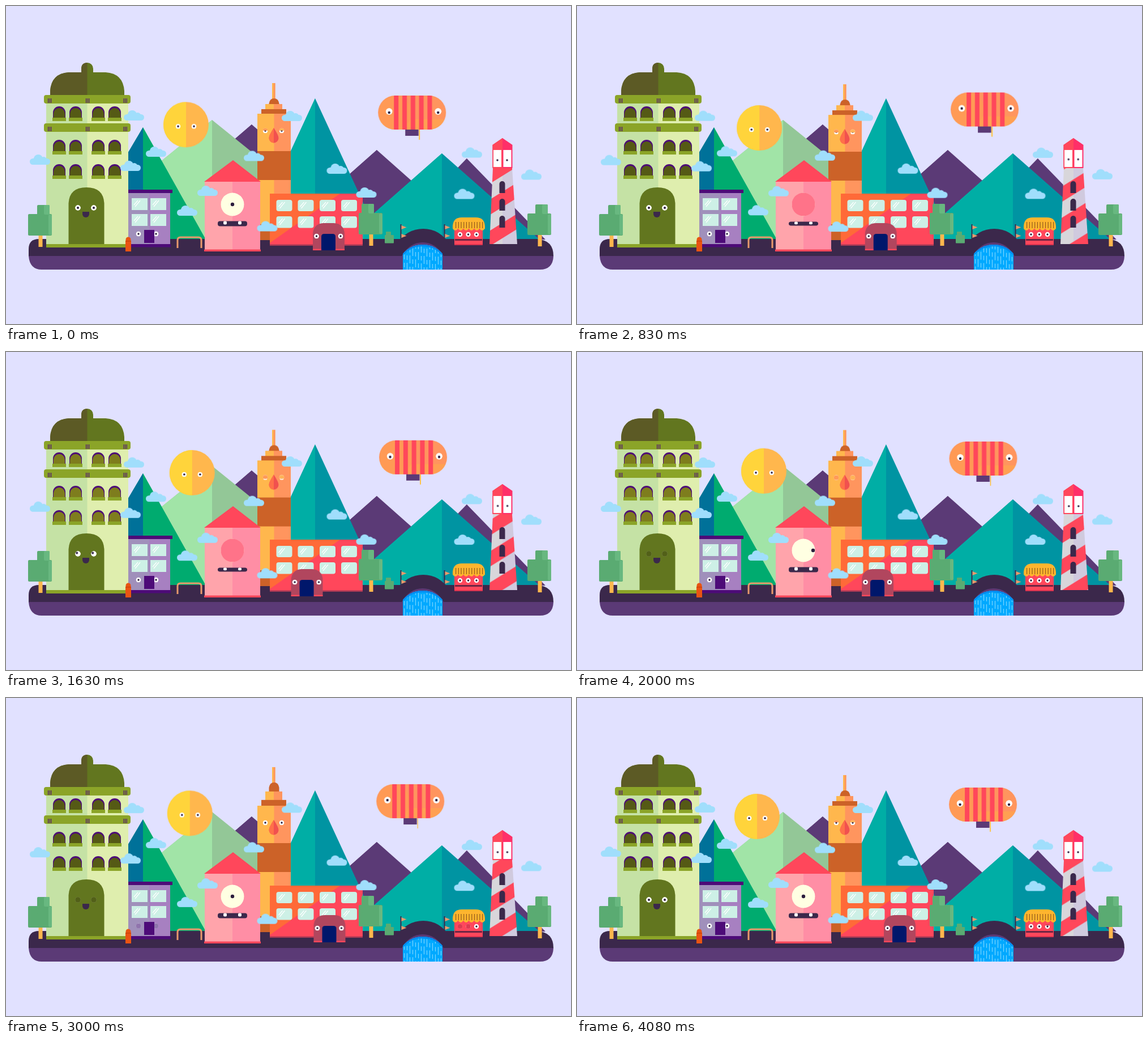
An HTML page for the animation above (4.12 s loop, 998 by 561 pixels).

```html
<!DOCTYPE html>
<html lang="en">
<head>
<meta charset="utf-8">
<title>Little city</title>
<style>
  html, body { margin: 0; width: 100%; height: 100%; overflow: hidden; background: #e1e1ff; }
  svg { display: block; width: 100%; height: 100%; }
  svg * { animation: 4120ms linear infinite; transform-origin: 0 0; }

  .sun { animation-name: orbit; }
  .sway, .bob, .peek, .cloud {
    animation-timing-function: cubic-bezier(.37, 0, .63, 1);
    animation-direction: alternate;
  }
  .sway { animation-name: sway; animation-duration: 2060ms; animation-delay: -1030ms; }
  .bob { animation-name: bob; animation-duration: 1030ms; }
  .peek { animation-name: peek; animation-duration: 1030ms; }
  .cloud { animation-name: drift; animation-duration: 2060ms; }
  .prop { animation-name: spin; animation-duration: 206ms; animation-direction: alternate; }
  .poles { animation-name: barber; animation-duration: calc(4120ms / 3); }
  .fall { animation-name: fall; stroke-dasharray: 8 5 14 6; }
  .squash { animation-name: squash; animation-timing-function: ease-in-out; }
  .rise { animation-name: rise; animation-timing-function: ease-in-out; }
  .slide { animation-name: slide; }
  .lit { animation-name: lit; }
  .chew { animation-name: chew; }
  .teeth { animation-name: teeth; }
  .grin { animation-name: grin; }
  .glance { animation-name: glance; }
  .gaze { animation-name: gaze; }
  .scan { animation-name: scan; }
  .lid { transform: scaleY(0); }
  .lid.hall { animation-name: lidHall; }
  .lid.villa { animation-name: lidVilla; }
  .lid.cyclops { animation-name: lidCyclops; }
  .lid.spire { animation-name: lidSpire; }
  .lid.gate { animation-name: lidGate; }
  .lid.kiosk { animation-name: lidKiosk; }

  @keyframes orbit {
    from { transform: rotate(180deg) translateX(6px) rotate(-180deg); }
    to { transform: rotate(-180deg) translateX(6px) rotate(180deg); }
  }
  @keyframes sway { from { transform: translateX(-3px); } to { transform: translateX(3px); } }
  @keyframes bob { from { transform: translateY(3px); } to { transform: translateY(-3px); } }
  @keyframes peek { from { transform: translateY(2px); } to { transform: none; } }
  @keyframes drift { from { transform: none; } to { transform: translateY(var(--d)); } }
  @keyframes spin { to { transform: scaleX(.3); } }
  @keyframes barber { to { transform: translateY(55px); } }
  @keyframes fall { to { stroke-dashoffset: -132; } }
  @keyframes squash {
    0%, 72.8%, 100% { transform: none; }
    10.2% { transform: translateY(calc(var(--k) * 3px)); }
    31.3%, 61.7% { transform: translateY(calc(var(--k) * 1px)); }
    48.5% { transform: translateY(calc(var(--k) * 1.7px)); }
  }
  @keyframes rise {
    0%, 65%, 99%, 100% { transform: none; }
    72.8% { transform: translateY(calc(var(--k) * -.54px)); }
    80% { transform: translateY(calc(var(--k) * -1px)); }
    93% { transform: translateY(calc(var(--k) * -.42px)); }
  }
  @keyframes slide {
    0%, 100% { transform: none; }
    5% { transform: translateX(-2px); }
    10.2%, 61.7% { transform: translateX(-13px); }
    22% { transform: translateX(-37px); }
    31.3% { transform: translateX(-38px); }
    48.5% { transform: translateX(-39px); }
    55% { transform: translateX(-34px); }
    70% { transform: translateX(1px); }
    72.8% { transform: translateX(1.5px); }
  }
  @keyframes lit { 0%, 24%, 57.5%, 100% { fill: #555a15; } 24.7%, 56.8% { fill: #7e7d1d; } }
  @keyframes chew {
    0%, 28%, 37%, 57%, 67%, 100% { transform: none; }
    30%, 34%, 60%, 64% { transform: scaleY(.26); }
  }
  @keyframes teeth { 0%, 29%, 36%, 59%, 66%, 100% { opacity: 0; } 30%, 34%, 60%, 64% { opacity: 1; } }
  @keyframes grin {
    0%, 6%, 45%, 57%, 67%, 100% { transform: none; }
    9%, 42%, 60%, 64% { transform: scaleY(.75); }
  }
  @keyframes glance {
    0%, 24%, 77%, 100% { transform: none; }
    28%, 70% { transform: translate(-1.8px, -1.5px); }
  }
  @keyframes gaze { 0%, 44%, 58%, 100% { transform: none; } 47.5%, 53% { transform: translateX(17px); } }
  @keyframes scan {
    0%, 100% { transform: none; }
    10% { transform: translateY(-2px); }
    48% { transform: translateX(.8px); }
  }
  @keyframes lidHall {
    0%, 45%, 52.5%, 69%, 76.5%, 100% { transform: scaleY(0); }
    46.5%, 51%, 70.5%, 75% { transform: none; }
  }
  @keyframes lidVilla {
    0%, 28%, 34.5%, 70%, 76%, 100% { transform: scaleY(0); }
    29.5%, 33%, 71.5%, 74.5% { transform: none; }
  }
  @keyframes lidCyclops {
    0%, 6%, 45%, 57%, 67%, 100% { transform: scaleY(0); }
    9%, 42%, 60%, 64% { transform: none; }
  }
  @keyframes lidSpire {
    0%, 31.3%, 100% { transform: scaleY(.5); }
    10.2% { transform: scaleY(.8); }
    45%, 64% { transform: none; }
    70%, 90% { transform: scaleY(0); }
  }
  @keyframes lidGate {
    0%, 7%, 14%, 58%, 66%, 100% { transform: scaleY(0); }
    9%, 12%, 60%, 63.5% { transform: none; }
  }
  @keyframes lidKiosk { 0%, 57%, 83%, 100% { transform: scaleY(0); } 59%, 80% { transform: none; } }
</style>
</head>
<body>
<svg id="stage" viewBox="0 0 998 561" preserveAspectRatio="none"></svg>
<script>
const INK = '#3b284b', PLUM = '#5b3a76', VIOLET = '#4d0b78', RED = '#ff475b', MOSS = '#8ba428',
      AMBER = '#ffb74d', CORAL = '#ff955e', BROWN = '#cc6228', GLASS = '#cdf0e6';

const each = (list, fn) => list.map(fn).join('');
const count = (n, fn) => each([...Array(n).keys()], fn);
const rect = (x, y, w, h, fill, rx = 0, more = '') =>
  `<rect x="${x}" y="${y}" width="${w}" height="${h}" fill="${fill}" rx="${rx}" ${more}/>`;
const path = (d, fill, more = '') => `<path d="${d}" fill="${fill}" ${more}/>`;
const line = (d, stroke, width, more = '') =>
  path(d, 'none', `stroke="${stroke}" stroke-width="${width}" ${more}`);
const disc = (x, y, r, fill) => `<circle cx="${x}" cy="${y}" r="${r}" fill="${fill}"/>`;
const at = (x, y, body) => `<g transform="translate(${x} ${y})">${body}</g>`;
const move = (name, body, style = '') => `<g class="${name}" style="${style}">${body}</g>`;
const halves = (x, y, w, h, left, right) => rect(x, y, w, h, right) + rect(x, y, w / 2, h, left);

let ids = 0;
function clip(shape, body) {
  const id = 'c' + ids++;
  return `<clipPath id="${id}">${shape}</clipPath><g clip-path="url(#${id})">${body}</g>`;
}

function eye(x, y, r, pupil, { lid, blink, look = '', delay = 0, white = '#fff' } = {}) {
  const cover = lid
    ? at(0, -r, rect(-r, 0, 2 * r, 2 * r, lid, 0, `class="lid ${blink}" style="animation-delay:${delay}ms"`))
    : '';
  return at(x, y, clip(disc(0, 0, r), disc(0, 0, r, white) + move(look, disc(0, 0, pupil, '#2b1d3d')) + cover));
}

function peak(x, y, slope, left, right = left, base = 412) {
  const half = (base - y) / slope;
  return path(`M${x} ${y}L${x + half} ${base}H${x - half}Z`, right) +
         path(`M${x} ${y}V${base}H${x - half}Z`, left);
}

function pane(x, y, w, h, rx = 0) {
  return rect(x, y, w, h, GLASS, rx) +
    line(`M${x + 4} ${y + 12}l7-8M${x + 6} ${y + 15}l9-11`, '#fff', 1.2);
}

function tree(x, y, topX) {
  return rect(x + 18.5, y + 50, 7, 24, AMBER) +
    rect(x, y + 16, 42, 38, '#5aab72', 2) + rect(x + topX, y, 22, 30, '#5aab72', 2) +
    rect(x + topX + 12, y, 10, 17, '#68b880', 2) + rect(x + 36, y + 17, 6, 36, '#68b880', 2);
}

function mountains() {
  return peak(434, 209, .86, PLUM) +
    peak(364, 201, .806, '#a1e4a7', '#93c797') +
    path('M242 214L353 412H216V258Z', '#00ab6f') + path('M242 214V412H216V258Z', '#007199') +
    peak(655, 254, .885, PLUM) +
    peak(546, 163, 2.16, '#00aea5', '#0094a2') +
    peak(814, 269, 1.03, PLUM) +
    peak(770, 260, .88, '#00aea5', '#0094a2');
}

function sun() {
  return at(324, 209.3, move('sun',
    disc(0, 0, 40, AMBER) + path('M0-40A40 40 0 0 0 0 40Z', '#ffd43b') +
    eye(-14, 3, 4.5, 1.8) + eye(14, 3, 4.5, 1.8)));
}

function ground() {
  return path('M40 441V429Q40 411 58 411H938Q967 413 967 441Z', INK) +
    path('M40 441H967Q966 465 943 465H63Q42 465 40 441Z', PLUM);
}

function hall() {
  const arch = (x, y, delay) =>
    path(`M${x - 11} ${y + 22}V${y + 11}a11 11 0 0 1 22 0V${y + 22}Z`, VIOLET) +
    path(`M${x - 10} ${y + 22}V${y + 13}a10 10 0 0 1 20 0V${y + 22}Z`, '#555a15',
      `class="lit" style="animation-delay:${delay}ms"`) +
    rect(x - 12, y + 20, 24, 6, MOSS);
  const cornice = y => rect(67, y, 153, 15, MOSS, 4) +
    each([74, 141, 207.5], x => count(3, i => rect(x + i * 2.6, y + 6, 1.1, 8, VIOLET)));
  const face = { lid: '#526018', blink: 'hall', look: 'glance' };
  return halves(71, 165, 145, 258, '#c5e2a5', '#dfeeae') +
    path('M78 157V150Q80 119 111 117H176Q207 119 209 150V157Z', '#62761f') +
    path('M133 118V110.5a10.5 10.5 0 0 1 21 0V118Z', '#62761f') +
    path('M78 157V150Q80 119 111 117H133V110.5Q133 100 143.5 100V157Z', '#5c5a25') +
    cornice(157) + cornice(207) +
    each([[177, -3650], [236, -3900], [279, 0]], ([y, delay]) =>
      each([94, 123, 163, 192], x => arch(x, y, delay))) +
    path('M110.5 420V348Q112 320 142 320T173.5 348V420Z', '#62761f') +
    eye(127, 356, 5, 2, face) + eye(155, 356, 5, 2, face) +
    path('M135 363H147V367a6 6 0 0 1-12 0Z', INK) +
    rect(71, 420, 145, 6, MOSS);
}

function villa() {
  const face = { lid: '#9074ad', blink: 'villa' };
  return halves(216, 328, 74, 94, '#a090bb', '#a780c1') + rect(216, 420, 75, 5.5, VIOLET) +
    rect(216, 324, 78, 6, VIOLET) +
    each([222, 255], x => pane(x, 339, 28, 21) + pane(x, 367, 28, 21)) +
    eye(234, 402, 4.5, 1.7, face) + eye(265, 402, 4.5, 1.7, face) +
    at(244, 418, rect(0, -23, 18, 23, VIOLET, 0, 'class="chew"')) +
    rect(246.5, 413.5, 13, 3, '#fff', 0, 'class="teeth"');
}

function street() {
  return rect(211.5, 407.5, 9, 25, '#e85412', 4.5) + rect(211, 415, 10, 18, '#ea5413') +
    rect(211, 414, 10, 1.5, '#c9440c') +
    line('M303 427V413Q303 408 308 408H340Q345 408 345 413V427', '#e99a6c', 3);
}

function cyclops() {
  return halves(351, 310, 98, 121, '#ffa4ab', '#ff8ea5') +
    path('M401 272L450 310H350Z', RED) + rect(350, 429.5, 100, 3.5, RED) +
    eye(400, 350, 20.7, 3.2, { lid: '#ff7389', blink: 'cyclops', look: 'gaze', white: '#ffffe2' }) +
    at(400, 384, move('grin', rect(-26, -4.5, 52, 9, INK, 4) +
      rect(-16, -4.5, 6, 6, '#fff', 2) + rect(10, -4.5, 6, 6, '#fff', 2)));
}

function skyscraper() {
  const spire = rect(470, 136, 5.5, 30, AMBER) + rect(472.7, 136, 2.8, 30, CORAL);
  const dome = path('M464.5 200V172Q466 163 473.5 163T482.5 172V200Z', BROWN);
  const top = move('rise', halves(458, 173, 30, 30, AMBER, CORAL), '--k:11');
  const crown = move('rise', move('rise', spire + dome, '--k:11') + top.replace('class="rise"', ''), '--k:11');
  const head = move('rise', crown + rect(451, 182, 44, 18, BROWN), '--k:4');
  const face = lid => ({ lid, blink: 'spire' });
  return halves(444, 295, 59, 118, AMBER, CORAL) + rect(444, 385, 59, 28, BROWN) +
    move('squash', head + halves(444, 190, 59, 70, AMBER, CORAL) +
      eye(458, 220, 4.5, 1.7, face('#ff9a57')) + eye(487, 220, 4.5, 1.7, face('#ffb358')) +
      path('M473 215Q482 229 481.5 233a8.5 8.5 0 0 1-17 0Q464 229 473 215Z', '#f1514f') +
      path('M473 215V241.5a8.5 8.5 0 0 1-8.5-8.5Q464 229 473 215Z', '#ff7049'), '--k:1') +
    move('squash', rect(444, 256, 59, 51, BROWN), '--k:.5');
}

function school() {
  const face = { lid: '#963a53', blink: 'gate' };
  return rect(466, 331, 164, 90, RED) + path('M466 331H590L466 418Z', '#ff6a38') +
    rect(466, 420.5, 164, 2.5, '#a83a56') +
    each([477.5, 515.5, 554, 592], x => pane(x, 342, 28, 20, 4) + pane(x, 371, 28, 20.5, 4)) +
    move('slide',
      path('M542 431V402Q543 384 561 383H579Q597 384 598 402V431Z', '#b1465e') +
      rect(542, 428.5, 56, 2.5, RED) +
      path('M557 431V407Q557 402 562 402H577Q582 402 582 407V431Z', '#00176b') +
      eye(548.5, 406, 4.5, 1.7, face) + eye(591, 406, 4.5, 1.7, face));
}

function bridge() {
  const water = 'M701 465V437Q715 421 736 421T771 437V465Z';
  const flag = (x, y) => path(`M${x} ${y}l9 3.5-9 3.5Z`, '#e99a6c');
  return path('M690 420Q708 393 737 393T783 420V440H690Z', INK) +
    path('M699 441Q713 417 736 417T773 441Z', PLUM) +
    path(water, '#00a9ff') +
    clip(path(water), count(14, i =>
      line(`M${703.5 + i * 5} ${420 - i * 13 % 33}V466`, '#7dd6ff', 1.2, 'class="fall"')) +
      line('M701 438Q715 422 736 422T771 438', '#008cf0', 4)) +
    each([697.5, 774.5], x => rect(x - 1, 385, 2, 27, INK) + flag(x + 1, 387) + flag(x + 1, 402));
}

function kiosk() {
  return rect(792, 392, 50, 30, RED) + rect(793, 411, 48, 3, '#6d2644') + rect(792, 420, 50, 2, '#d93350') +
    path('M789 393V388Q790 373 805 373H830Q845 373 846 388V393Z', '#ffb52e') +
    count(6, i => disc(793.7 + i * 9.5, 391.5, 4.4, '#ffb52e')) +
    count(11, i => rect(794 + i * 4.7, 381, 1.2, 11, '#8f5a1c')) +
    each([[802, 0], [816.5, -3970], [831, -3420]], ([x, delay]) =>
      eye(x, 403, 4.4, 1.7, { lid: '#dd3a50', blink: 'kiosk', delay }));
}

function lighthouse() {
  const stripe = k => {
    const s = 230 + 55 * k;
    return path(`M850 ${s + 4.3}L906 ${s - 30.4}v27L850 ${s + 31.3}Z`, RED);
  };
  const body = 'M860 286H894L903 420H854Z';
  return clip(path(body),
      rect(850, 280, 27, 141, '#d8d6da') + rect(877, 280, 28, 141, '#d0cade') +
      move('poles', count(5, stripe))) +
    each([309, 340, 370], y => path(`M871.5 ${y + 21}V${y + 5}a5 5 0 0 1 10 0V${y + 21}Z`, INK)) +
    path('M877 233L894.5 245V286H859.5V245Z', '#ff2f68') + path('M877 233V286H859.5V245Z', RED) +
    each([861, 878.5], x => rect(x, 254, 14, 30, '#fff')) +
    move('scan', disc(868, 272, 1.8, INK) + disc(885, 272, 1.8, INK));
}

function blimp() {
  const body = rect(-60, -30, 120, 60, CORAL, 30);
  return at(717.2, 185, move('sway', move('bob',
    at(13, 30, rect(-1, 0, 2, 18, '#ffc23d', 0, 'class="prop"')) +
    rect(-12, 29, 23.5, 12, PLUM) + body +
    clip(body, rect(-60, 12, 120, 20, '#ffa052') + disc(-30, 0, 29, '#ff9a55') +
      count(5, i => rect(-32 + i * 14.8, -30, 8, 60, RED))) +
    eye(-40.5, -2, 6, 2.2, { look: 'peek' }) + eye(46, -2, 6, 2.2, { look: 'peek' }))));
}

function clouds() {
  const spots = [
    [60, 271, 2], [226, 193, 2], [265, 257, -2], [220, 282, 2], [320, 361, -2], [356, 326, 2],
    [438, 264.5, -2], [461.5, 388.5, 2], [505, 194, -1], [584.5, 287, -.5], [636.5, 329, 2],
    [809.5, 331.5, -.5], [823, 258.5, 1], [928, 297.5, -2]
  ];
  return each(spots, ([x, y, d]) => at(x, y, `<g class="cloud" style="--d:${d}px" fill="#a0defc">` +
    '<rect x="-18" y="-2" width="36" height="11" rx="5.5"/><circle cx="-3" cy="-1" r="8"/>' +
    '<circle cx="6.5" cy="1" r="6"/><circle cx="-10" cy="2" r="4.5"/></g>'));
}

document.getElementById('stage').innerHTML = [
  mountains(), sun(), ground(), hall(), villa(), street(), skyscraper(), cyclops(), school(),
  tree(39, 351, 16), tree(623, 349, 5), tree(921, 350, 14),
  rect(669, 404, 16, 14.5, '#5aab72', 1), rect(671, 398, 9, 10, '#5aab72', 1),
  bridge(), kiosk(), lighthouse(), blimp(), clouds()
].join('');
</script>
</body>
</html>
```
